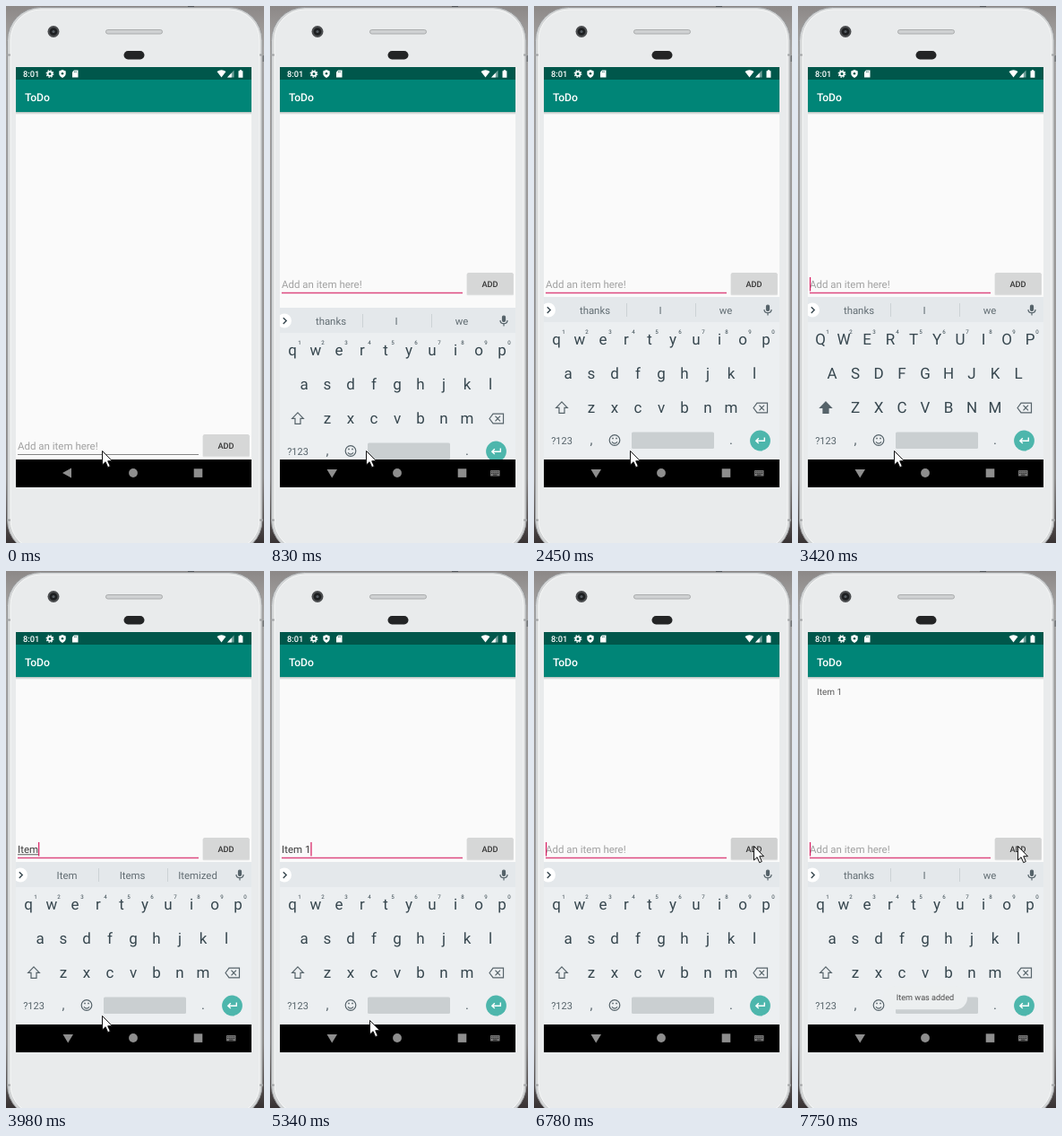
These frames come from a looping animation (288x598 px, 8 s). An HTML page:

```html
<!DOCTYPE html>
<html lang="en">
<head>
<meta charset="utf-8">
<title>ToDo app</title>
<style>
html, body { margin: 0; width: 100%; height: 100%; overflow: hidden; background: #777; }
svg { display: block; width: 288px; height: 598px; font-family: Roboto, "Open Sans", sans-serif; text-rendering: geometricPrecision; }
.mid { text-anchor: middle; }
.med { font-weight: 500; }
</style>
</head>
<body>
<svg viewBox="0 0 288 598" xmlns="http://www.w3.org/2000/svg">
  <defs>
    <linearGradient id="desk" x1="0" y1="0" x2="0" y2="1">
      <stop offset="0" stop-color="#8c8887"/><stop offset=".08" stop-color="#a9a7a6"/>
      <stop offset=".88" stop-color="#8b8887"/><stop offset="1" stop-color="#383233"/>
    </linearGradient>
    <linearGradient id="shade" x1="0" y1="0" x2="0" y2="1">
      <stop offset="0" stop-color="#b4bdbb"/><stop offset="1" stop-color="#fafafa"/>
    </linearGradient>
    <clipPath id="view"><rect x="11" y="118" width="263" height="387"/></clipPath>
  </defs>

  <!-- phone body -->
  <rect width="288" height="598" fill="url(#desk)"/>
  <rect x="203" width="7" height="3" fill="#55575a"/>
  <path d="M284 55h4v7h-4z" fill="#77797b"/>
  <rect x="1.5" y="1.5" width="284.500" height="608" rx="37" fill="#d3d5d6" stroke="#96989a"/>
  <rect x="5" y="4" width="278" height="602" rx="34" fill="#e9ebec" stroke="#f7f8f8"/>
  <path d="M1 54.500h4M283 54.500h4M1 572.500h4M283 572.500h4" stroke="#a4a6a8" stroke-width="2"/>
  <circle cx="53" cy="28.500" r="6.500" fill="#4b4d4f"/>
  <circle cx="53" cy="28.500" r="4.300" fill="#1d1f21"/>
  <circle cx="53" cy="28.500" r="1.600" fill="#565c62"/>
  <rect x="111.500" y="26.500" width="63" height="4.500" rx="2.200" fill="#cfd1d2" stroke="#a9abac"/>
  <rect x="131.500" y="50" width="23" height="9.500" rx="4.700" fill="#232425"/>

  <!-- app -->
  <rect x="11" y="118" width="263" height="387" fill="#fafafa"/>
  <rect x="11" y="118" width="263" height="3" fill="url(#shade)"/>
  <rect x="11" y="68" width="263" height="14.500" fill="#00574b"/>
  <rect x="11" y="82" width="263" height="36" fill="#008577"/>
  <g fill="#fff">
    <text x="19" y="79" font-size="9.300" class="med">8:01</text>
    <circle cx="49" cy="75.500" r="2.400" fill="none" stroke="#fff" stroke-width="1.700"/>
    <circle cx="49" cy="75.500" r="3.800" fill="none" stroke="#fff" stroke-width="1.200" stroke-dasharray="1.500 1.484"/>
    <path d="M63 71l3.700 1.500v2.800q0 3-3.700 4.700-3.700-1.700-3.700-4.700v-2.800z"/>
    <circle cx="63" cy="75.300" r="1.300" fill="#00574b"/>
    <path d="M76 71.500h4.500v8h-6.500v-6z"/>
    <path d="M76.700 72.500v1.700M78.200 72.500v1.700" stroke="#00574b" stroke-width=".7"/>
    <path d="M235.500 73q5-3.600 10 0l-5 6.500z"/>
    <path d="M247 79.500h7.500v-8z" opacity=".45"/><path d="M247 79.500h4.800v-5.100z"/>
    <path d="M259.500 72.300h1.300v-1h2.300v1h1.300v7.500h-4.900z"/>
    <text x="21" y="105.800" font-size="12.200" class="med">ToDo</text>
  </g>
  <text id="item" x="21" y="138" font-size="10" fill="#5b5b5b">Item 1</text>

  <g id="form">
    <text id="entry" x="13" y="314" font-size="11.500"></text>
    <path id="compose" stroke="#444" stroke-width=".9"/>
    <path id="line" d="M13 319.500H215"/>
    <path id="caret" stroke="#d81b60" stroke-width="1.200"/>
    <rect x="219.500" y="297.800" width="52.500" height="24.500" rx="1.500" fill="#dedfdf"/>
    <rect id="button" x="220" y="297" width="51.500" height="24" rx="1.500"/>
    <text x="245.500" y="312.500" font-size="9.200" class="mid med" fill="#333">ADD</text>
  </g>

  <g clip-path="url(#view)"><g id="board">
    <rect x="11" y="324" width="263" height="182" fill="#eceff1"/>
    <rect x="11" y="324" width="263" height="28" fill="#e4e8eb"/>
    <circle cx="16" cy="338.500" r="8" fill="#fff"/>
    <path d="M14.800 335.300l3.400 3.300-3.400 3.300" fill="none" stroke="#37474f" stroke-width="1.400"/>
    <g id="hints" font-size="11.400" fill="#626d73" class="mid">
      <path d="M103.500 331v15M180.500 331v15" stroke="#ccd2d5"/>
      <text x="68" y="343"></text><text x="141" y="343"></text><text x="214" y="343"></text>
    </g>
    <g fill="none" stroke="#56636a" stroke-width="1.200">
      <rect x="259.500" y="333" width="3" height="6.500" rx="1.500" fill="#56636a"/>
      <path d="M257 338q0 3.700 4 3.700t4-3.700M261 341.700v2.800"/>
      <path id="shift" d="M31 440.800l6.300 6.500h-3.300v6h-6v-6h-3.300z"/>
      <path d="M245 447.500l4-5.300h11.500v10.600h-11.500zM251.500 444.700l5.500 5.600M257 444.700l-5.500 5.600"/>
      <circle cx="90" cy="483.500" r="5.800"/>
      <path d="M87 485.300q3 3.500 6 0"/>
    </g>
    <path d="M87.200 481.500h1.600M91.200 481.500h1.600" stroke="#56636a" stroke-width="1.600"/>
    <g id="keys" class="mid" fill="#37474f" font-size="17"></g>
    <g class="mid" fill="#56636a">
      <text x="31" y="487.500" font-size="11">?123</text>
      <text x="64" y="488" font-size="15">,</text>
      <text x="220" y="488" font-size="15">.</text>
    </g>
    <rect x="109" y="474.500" width="92" height="18.500" rx="1.500" fill="#cacfd1"/>
    <circle cx="252.500" cy="484" r="11.400" fill="#4db6ac"/>
    <path d="M257.300 480.500v3.700h-9M250.800 481.300l-3 2.900 3 2.900" fill="none" stroke="#fff" stroke-width="1.400"/>
  </g></g>

  <g id="toast">
    <rect x="95" y="462" width="94" height="26.300" rx="13" fill="#eceff0"/>
    <text x="142" y="477.500" font-size="9.100" class="mid" fill="#4a4a4a">Item was added</text>
  </g>

  <!-- navigation bar -->
  <rect x="11" y="505" width="263" height="31" fill="#000"/>
  <g fill="#8e8e8e">
    <path id="back"/>
    <circle cx="142" cy="520" r="4.900"/>
    <rect x="209.700" y="515.300" width="9.600" height="9.600"/>
    <g id="imeIcon">
      <rect x="246" y="517" width="10.500" height="6.500" rx=".6" fill="#777"/>
      <path d="M247 518.700h8.500M247 520.500h8.500" stroke="#000" stroke-width=".8" stroke-dasharray=".8 1"/>
      <path d="M249 522.200h4.500" stroke="#000" stroke-width=".7"/>
    </g>
  </g>
  <path id="mouse" d="M0 0V15.500L3.600 12.200L6.200 18.200L8.800 17L6.200 11.200H11Z" fill="#fff" stroke="#111" stroke-width="1"/>
</svg>

<script>
const LOOP = 8000;
const $ = id => document.getElementById(id);
const set = (el, attrs) => { for (const k in attrs) el.setAttribute(k, attrs[k]); };
const show = (id, on) => set($(id), { visibility: on ? "visible" : "hidden" });

// Each track is a list of [start, value]; a value holds until the next start.
const at = (track, t) => track.reduce((v, [start, next]) => t >= start ? next : v, track[0][1]);

const typed = [[0, ""], [3560, "I"], [3700, "It"], [3840, "Ite"], [3980, "Item"],
  [4230, "Item "], [4380, "Item 1"], [6780, ""]];
const hints = [[0, "thanks,I,we"], [3560, "I,I'm,I'll"], [3700, "It,It's,Its"], [3840, "Item,Items,Ite"],
  [3980, "Item,Items,Itemized"], [4380, ""], [7200, "thanks,I,we"]];
const caretOn = [[0, 0], [1090, 1], [1500, 0], [2050, 1], [2450, 0], [3010, 1],
  [4910, 0], [5340, 1], [5920, 0], [6780, 1], [7340, 0], [7750, 1]];
const slide = [[0, 182], [670, 70], [810, 12], [950, 1], [1090, 0]];
const mouse = [[0, [107.5, 495.5]], [5340, [111.5, 500.5]], [5460, [150, 450]],
  [5600, [215, 375]], [5750, [268, 318]], [5920, [245.5, 306.5]]];
const press = [[0, "#d6d7d7"], [6320, "#cbcccc"], [6480, "#c8c9c9"], [6780, "#d0d1d1"], [7060, "#d3d4d4"]];
const toast = [[0, 0], [7200, .3], [7340, .6], [7480, .85], [7620, 1]];

function addText(x, y, str, size) {
  const el = document.createElementNS("http://www.w3.org/2000/svg", "text");
  set(el, { x, y });
  if (size) set(el, { "font-size": size });
  el.textContent = str;
  $("keys").append(el);
  return el;
}

const letters = [];
[["qwertyuiop", 25, 376.5], ["asdfghjkl", 38, 414.5], ["zxcvbnm", 64, 452.5]].forEach(([row, x0, y], r) =>
  [...row].forEach((ch, i) => {
    letters.push([addText(x0 + 26 * i, y, ch), ch]);
    if (!r) addText(x0 + 8 + 26 * i, 364.5, (i + 1) % 10, 6.2);
  }));

const entry = $("entry"), hintTexts = $("hints").querySelectorAll("text");

function draw(t) {
  const open = t >= 670, focused = t >= 150, ime = t >= 400;
  const text = at(typed, t), composing = t >= 3560 && t < 4230;
  set($("form"), { transform: `translate(0 ${open ? 0 : 180})` });
  entry.textContent = text.trimEnd() || "Add an item here!";
  set(entry, { fill: text ? "#3c3c3c" : "#a1a1a1" });
  set($("line"), focused ? { stroke: "#dc4a80", "stroke-width": 1.5 } : { stroke: "#858585", "stroke-width": 1 });

  const end = text ? 13 + entry.getComputedTextLength() : 13;
  const caretX = end + (text.endsWith(" ") ? 2.9 : 0) + .6;
  set($("caret"), { d: `M${caretX} 302V317.500` });
  show("caret", at(caretOn, t));
  set($("compose"), { d: `M13 315.800H${end}` });
  show("compose", composing);
  set($("button"), { fill: at(press, t) });

  show("board", open);
  set($("board"), { transform: `translate(0 ${at(slide, t)})` });
  const words = at(hints, t).split(",");
  hintTexts.forEach((el, i) => el.textContent = words[i] || "");
  set($("hints"), { opacity: words[0] ? 1 : 0 });

  const upper = t >= 3420 && t < 3560;
  letters.forEach(([el, ch]) => el.textContent = upper ? ch.toUpperCase() : ch);
  set($("shift"), { fill: upper ? "#56636a" : "none" });

  show("item", t >= 7060);
  set($("toast"), { opacity: at(toast, t) });
  set($("back"), { d: ime ? "M63.500 516H75L69.200 525.500Z" : "M63 520L73 514.500V525.500Z" });
  show("imeIcon", ime);
  set($("mouse"), { transform: `translate(${at(mouse, t)})` });
}

const began = performance.now();
function tick() {
  draw((performance.now() - began) % LOOP);
  requestAnimationFrame(tick);
}
tick();
</script>
</body>
</html>
```
